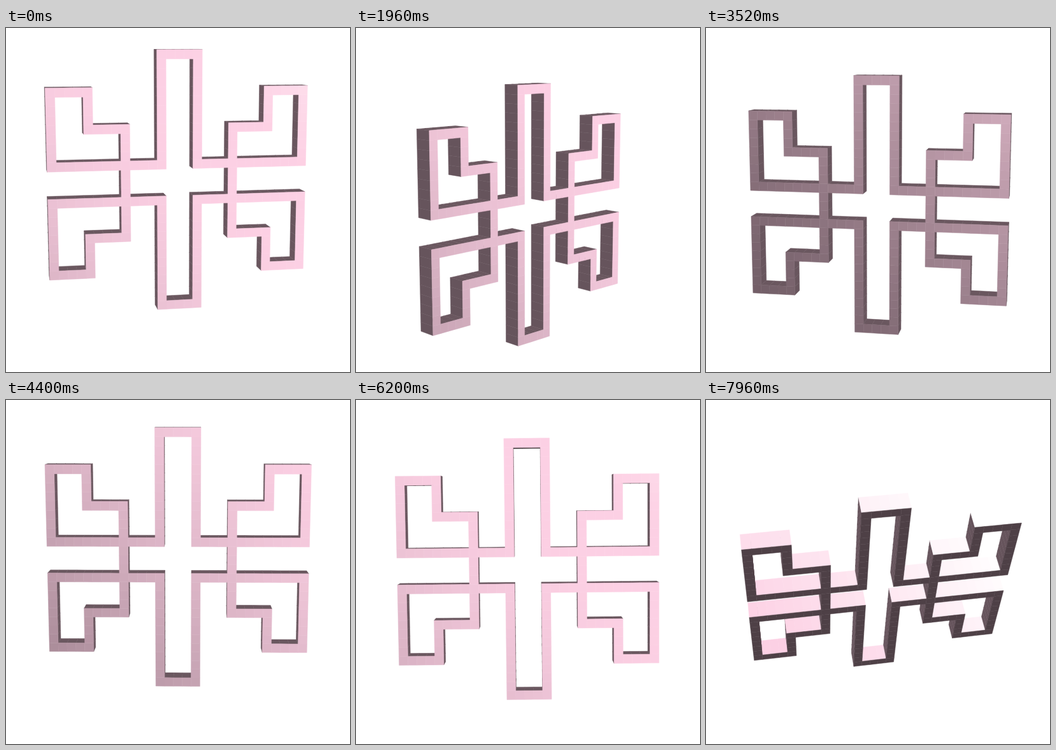
Write an HTML page with a canvas that moves like this. It is 540 by 540 pixels and loops after 8 s.

```html
<!DOCTYPE html>
<html lang="en">
<head>
<meta charset="utf-8">
<title>Turning ornament</title>
<style>
  html, body { margin: 0; width: 100%; height: 100%; overflow: hidden; background: #fff; }
  canvas { display: block; width: 540px; height: 540px; }
</style>
</head>
<body>
<canvas id="stage" width="540" height="540"></canvas>
<script>
const ctx = document.getElementById('stage').getContext('2d');
const LOOP = 8000, STEP = 40, BOB = 5040;
const FOCAL = 1432, DISTANCE = 51, CENTRE = 270;
const HALF_DEPTH = 0.5, HALF_CELL = 0.25;

// Eased half turn from -1 to 1 around a moment
const flip = (t, middle) => Math.tanh((t - middle) / 760);

// First a flip sideways, then one head over heels, with a slow bob
function poseAt(t) {
  const sideways = flip(t, 2484), over = flip(t, 7500);
  return {
    yaw: 95 + 85 * sideways - 6 * (1 + over),
    pitch: -79 - 89 * over,
    roll: 1.4 * (1 + flip(t, 6700)),
    lift: 1.07 * Math.cos(2 * Math.PI * t / BOB)
  };
}

// One quarter of the closed line; the rest is mirrored
const QUARTER = [[0, 7], [1, 7], [1, 1], [7, 1], [7, 5], [5, 5], [5, 3], [3, 3], [3, 0]];
const filled = new Map();
const cellKey = (i, j) => i + ',' + j;
for (let k = 1; k < QUARTER.length; k++) {
  const [ax, ay] = QUARTER[k - 1], [bx, by] = QUARTER[k];
  const steps = 2 * (Math.abs(bx - ax) + Math.abs(by - ay));
  for (let s = 0; s <= steps; s++) {
    const i = Math.round(2 * ax + 2 * (bx - ax) * s / steps);
    const j = Math.round(2 * ay + 2 * (by - ay) * s / steps);
    for (const [x, y] of [[i, j], [-i, j], [i, -j], [-i, -j]]) {
      filled.set(cellKey(x, y), [x, y]);
    }
  }
}

const faces = [], walls = [];
for (const [i, j] of filled.values()) {
  const x = i / 2, y = j / 2, h = HALF_CELL, d = HALF_DEPTH;
  for (const side of [-1, 1]) {
    const z = side * d;
    faces.push({
      normal: [0, 0, side], centre: [x, y, z],
      corners: [[x - h, y - h, z], [x + h, y - h, z], [x + h, y + h, z], [x - h, y + h, z]]
    });
  }
  for (const [nx, ny] of [[1, 0], [-1, 0], [0, 1], [0, -1]]) {
    if (filled.has(cellKey(i + nx, j + ny))) continue;
    const cx = x + nx * h, cy = y + ny * h, tx = ny * h, ty = nx * h;
    walls.push({
      normal: [nx, ny, 0], centre: [cx, cy, 0],
      corners: [[cx - tx, cy - ty, -d], [cx + tx, cy + ty, -d],
        [cx + tx, cy + ty, d], [cx - tx, cy - ty, d]]
    });
  }
}

function rotator({ yaw, roll, pitch }) {
  const turn = deg => [Math.cos(deg * Math.PI / 180), Math.sin(deg * Math.PI / 180)];
  const [cy, sy] = turn(yaw), [cr, sr] = turn(roll), [cp, sp] = turn(pitch);
  return ([x, y, z]) => {
    const x1 = x * cy + z * sy, z1 = z * cy - x * sy;
    const x2 = x1 * cr - y * sr, y2 = x1 * sr + y * cr;
    return [x2, y2 * cp - z1 * sp, y2 * sp + z1 * cp];
  };
}

const clamp = v => Math.min(1, Math.max(0, v));

// Steep sheen around the light direction, bleaching to white at its peak
function shade(n, p) {
  const light = n[0] * 0.35 + n[1] * 0.35 + n[2] * 0.87 + 0.0045 * (p[0] + p[1]);
  const u = clamp((light - 0.62) / 0.24);
  const ambient = 0.415 + 0.14 * Math.min(0, n[1]);
  const level = ambient + (0.99 - ambient) * u * u * (3 - 2 * u);
  const white = clamp((light - 0.88) / 0.08);
  const rgb = [255, 210, 230].map(c => Math.round(c * level + (255 - c * level) * white));
  return `rgb(${rgb})`;
}

function draw(t) {
  const pose = poseAt(t), rotate = rotator(pose), lift = pose.lift;

  const visible = quads => quads.map(q => {
    const n = rotate(q.normal), c = rotate(q.centre);
    const toEye = [-c[0], -c[1] - lift, DISTANCE - c[2]];
    const facing = n[0] * toEye[0] + n[1] * toEye[1] + n[2] * toEye[2];
    return { q, n, c, facing, far: Math.hypot(...toEye) };
  }).filter(v => v.facing > 0).sort((a, b) => b.far - a.far);

  const paint = ({ q, n, c }) => {
    ctx.beginPath();
    for (const corner of q.corners) {
      const [x, y, z] = rotate(corner), scale = FOCAL / (DISTANCE - z);
      ctx.lineTo(CENTRE + x * scale, CENTRE - (y + lift) * scale);
    }
    ctx.closePath();
    ctx.fillStyle = ctx.strokeStyle = shade(n, c);
    ctx.fill();
    ctx.stroke();
  };

  ctx.fillStyle = '#fff';
  ctx.fillRect(0, 0, 540, 540);
  ctx.lineWidth = 0.5;
  ctx.lineJoin = 'round';
  visible(walls).forEach(paint);
  visible(faces).forEach(paint);
}

function tick() {
  draw(Math.floor(performance.now() % LOOP / STEP) * STEP);
  requestAnimationFrame(tick);
}
tick();
</script>
</body>
</html>
```
